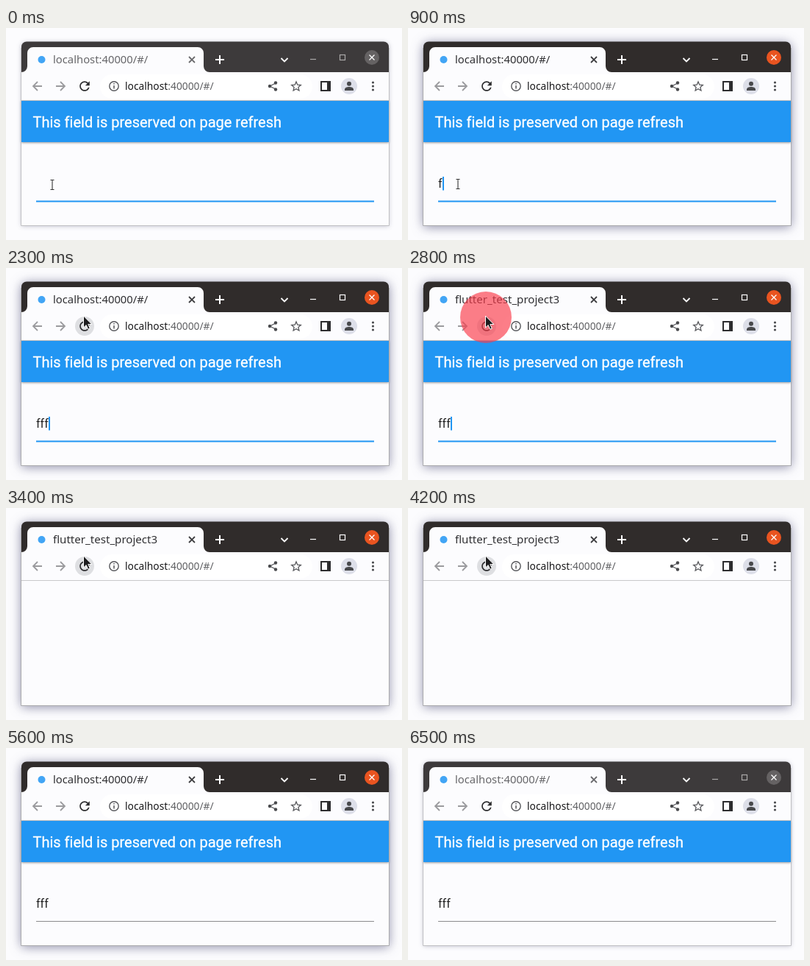
These frames come from a looping animation (539x288 px, 6600 ms). An HTML page:

```html
<!DOCTYPE html>
<html lang="en">
<head>
<meta charset="utf-8">
<title>Field preserved on refresh</title>
<style>
  html, body { margin: 0; width: 100%; height: 100%; overflow: hidden; background: #fcfcfe; }
  svg { display: block; width: 539px; height: 288px; }
  text { font-variant-ligatures: none; white-space: pre; }
  .ui { font-family: "Noto Sans", "Open Sans", sans-serif; }
  .app { font-family: Roboto, sans-serif; }
  .line { fill: none; stroke-width: 1.8; }
</style>
</head>
<body>
<svg viewBox="0 0 539 288">
  <path id="frame" d="M21 268V25.500a7 7 0 0 1 7-7H514a7 7 0 0 1 7 7V268Z"/>

  <!-- tab strip -->
  <path d="M21 60a8 8 0 0 0 8-8V34a8 8 0 0 1 8-8H261a8 8 0 0 1 8 8V52a8 8 0 0 0 8 8H521V268H21Z" fill="#fcfcfe"/>
  <circle cx="48.500" cy="43" r="5" fill="#42a5f5"/>
  <text id="tabTitle" class="ui" x="64" y="48"></text>
  <path id="tabClose" class="line" d="M249 39l8 8m0-8l-8 8"/>
  <g class="line" stroke="#fff">
    <path d="M285 43h12m-6-6v12" stroke-width="2"/>
    <path d="M374.500 41l4.500 4.500 4.500-4.500"/>
  </g>
  <g id="controls" class="line">
    <path d="M414 42.500h8" stroke-width="1.200"/>
    <rect x="454.500" y="36.500" width="7" height="7" stroke-width="1.200"/>
  </g>
  <circle id="closeDisc" cx="498" cy="40" r="10"/>
  <path d="M494.500 36.500l7 7m0-7l-7 7" stroke="#fff" stroke-width="1.300"/>

  <!-- toolbar -->
  <rect x="128" y="63" width="289" height="33" rx="16.500" fill="#fff"/>
  <g class="line" stroke="#9b9b9e">
    <path d="M49 79H37m6-6l-6 6 6 6"/>
    <path d="M68 79h12m-6-6l6 6-6 6"/>
  </g>
  <circle id="hover" cx="107" cy="79" r="13" fill="#dedfe2"/>
  <path transform="translate(96.800 68.800) scale(.85)" fill="#2d2d2f" d="M17.650 6.350C16.200 4.900 14.210 4 12 4c-4.420 0-7.990 3.580-7.990 8s3.570 8 7.990 8c3.730 0 6.840-2.550 7.730-6h-2.080c-.82 2.330-3.040 4-5.650 4-3.310 0-6-2.690-6-6s2.690-6 6-6c1.660 0 3.140.69 4.220 1.780L13 11h7V4z"/>
  <g class="line" stroke="#55565a" stroke-width="1.400">
    <circle cx="147" cy="79" r="6.200" stroke-width="1.400"/>
    <path d="M147 78v4.500m0-7.500v1.500" stroke-width="1.500"/>
    <path d="M367 75l-8 4 8 4" stroke-width="1.300"/>
    <path d="M395 73l1.800 4.200 4.500.4-3.400 3 1 4.400-3.900-2.300-3.900 2.300 1-4.400-3.400-3 4.500-.4z" stroke-width="1.300"/>
  </g>
  <g fill="#48494c">
    <circle cx="367" cy="74.500" r="2.200"/><circle cx="359" cy="79" r="2.200"/><circle cx="367" cy="83.500" r="2.200"/>
    <path fill="#2d2d2f" fill-rule="evenodd" d="M428 72h14v14h-14zm2 2v10h7v-10z"/>
    <circle cx="467" cy="79" r="11" fill="#dddfe9"/>
    <circle cx="467" cy="75.800" r="3"/>
    <path d="M461 85v-1.500c0-2.500 3-3.500 6-3.500s6 1 6 3.500V85z"/>
    <circle cx="499.500" cy="74" r="1.600"/><circle cx="499.500" cy="79" r="1.600"/><circle cx="499.500" cy="84" r="1.600"/>
  </g>
  <text class="ui" x="162" y="84" font-size="13.800" fill="#18181a">localhost<tspan fill="#606164">:40000/#/</tspan></text>
  <path d="M21 98.500H521" stroke="#c9c9cb"/>

  <!-- page -->
  <g id="page">
    <rect x="21" y="99" width="500" height="56" fill="#2196f3" style="filter:drop-shadow(0 1px 1.500px rgba(0,0,0,.4))"/>
    <text class="app" x="36.500" y="135" font-size="20" fill="#fff" stroke="#fff" stroke-width=".3">This field is preserved on page refresh</text>
    <text id="field" class="app" x="41" y="217" font-size="16" fill="#222"></text>
    <rect id="caret" y="202" width="2" height="18.500" fill="#2196f3"/>
    <rect id="underline" x="41" width="460"/>
  </g>
  <path id="border" d="M20.500 27V268.500H521.500V27" fill="none"/>

  <circle id="click" cx="106" cy="67" r="35" fill="#fa3c4b" fill-opacity=".66"/>
  <g id="pointer">
    <path id="arrow" d="M0 0V16l3.700-3.500 2.500 5.800 2.600-1.100-2.500-5.700h5z" fill="#1c1c1e" stroke="#fff"/>
    <path id="beam" d="M-2.500-6.500h2l.5.500.5-.500h2M0-6V6m-2.500.500h2l.5-.500.5.500h2" fill="none" stroke="#333" stroke-width="1.100"/>
  </g>
</svg>
<script>
const LOOP = 6600, STEP = 100;
const KEYS = [800, 1100, 1300];
const FOCUS = 300, BLUR = 6200, CLICK = 2700, UNLOAD = 3100, LOADED = 5000;
const POINTER = [
  [0, 63, 213], [300, 63, 213], [700, 68, 212], [1400, 68, 212],
  [1700, 86, 141], [2100, 105.5, 65], [4900, 105.5, 65], [5300, 120, -24]
];
const $ = id => document.getElementById(id);
const set = (id, attrs) => {
  for (const name in attrs) $(id).setAttribute(name, attrs[name]);
};
const show = (id, on) => set(id, { visibility: on ? "inherit" : "hidden" });
const between = (t, from, to) => t >= from && t < to;

function pointerAt(t) {
  const next = POINTER.findIndex(p => p[0] > t);
  if (next < 0) return POINTER[POINTER.length - 1].slice(1);
  const [t0, x0, y0] = POINTER[next - 1], [t1, x1, y1] = POINTER[next];
  const k = (t - t0) / (t1 - t0);
  return [x0 + (x1 - x0) * k, y0 + (y1 - y0) * k];
}

function caretOn(t) {
  if (!between(t, 500, UNLOAD)) return false;
  if (t >= CLICK) return true;
  const lastKey = KEYS.filter(k => k <= t).pop() ?? 500;
  return Math.floor((t - lastKey) / 500) % 2 === 0;
}

function drawWindow(t) {
  const active = between(t, FOCUS, BLUR);
  const reloading = between(t, CLICK, LOADED);
  set("frame", { fill: active ? "#302c2b" : "#3d3a3b" });
  $("frame").style.filter = active
    ? "drop-shadow(0 2px 7.5px rgba(40,40,90,.55))"
    : "drop-shadow(0 1px 3px rgba(40,40,80,.3))";
  set("border", { stroke: active ? "#aaaaad" : "#c0c0c3" });
  set("controls", { stroke: active ? "#fff" : "#aaa8a8" });
  set("closeDisc", { fill: active ? "#e95420" : "#656263" });
  set("tabClose", { stroke: active ? "#3b3b3e" : "#68686b" });
  set("tabTitle", {
    fill: active ? "#303033" : "#67676a",
    "font-size": reloading ? 15.1 : 14.8
  });
  $("tabTitle").textContent = reloading ? "flutter_test_project3" : "localhost:40000/#/";
}

function drawPage(t) {
  const typed = KEYS.filter(k => k <= t).length;
  const focused = t < UNLOAD;
  show("page", !between(t, UNLOAD, LOADED));
  $("field").textContent = "f".repeat(typed);
  set("caret", { x: Math.round(41 + typed * 5.6) });
  show("caret", caretOn(t));
  set("underline", {
    y: focused ? 234.5 : 235,
    height: focused ? 2 : 1,
    fill: focused ? "#2196f3" : "#8b8b8d"
  });
}

function drawPointer(t) {
  const [x, y] = pointerAt(t);
  const overField = y > 188 && y < 236;
  set("pointer", { transform: `translate(${x} ${y})` });
  show("arrow", !overField);
  show("beam", overField);
  show("hover", Math.hypot(x - 107, y - 79) < 15);
  show("click", between(t, CLICK, 3000));
}

function render(now) {
  const t = Math.floor((now % LOOP) / STEP) * STEP;
  drawWindow(t);
  drawPage(t);
  drawPointer(t);
}

const start = performance.now();
function tick() {
  render(performance.now() - start);
  requestAnimationFrame(tick);
}
tick();
</script>
</body>
</html>
```
